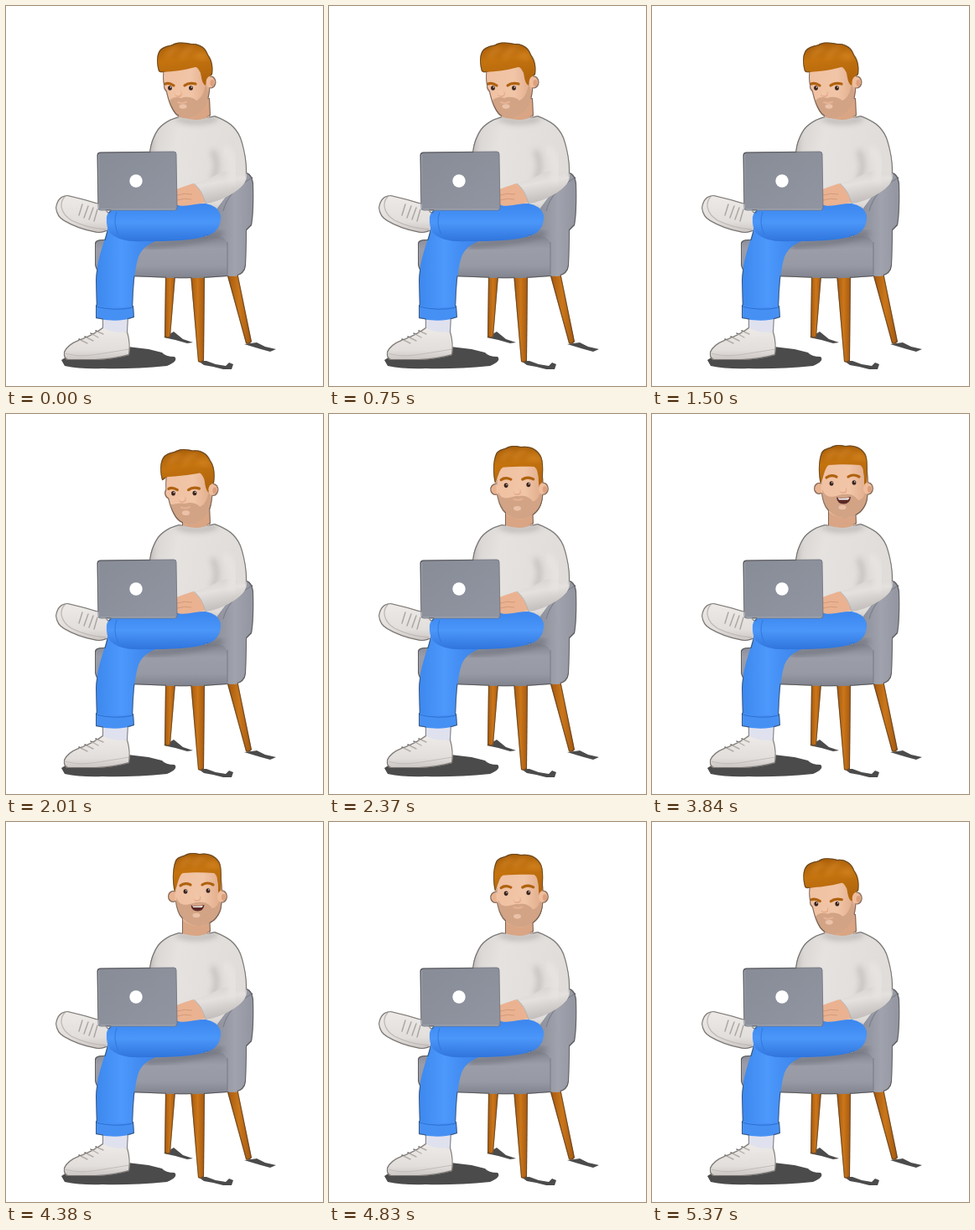
Write an HTML page that moves like this. It is 378 px wide and 454 px high and loops after 5.4 s.

```html
<!DOCTYPE html>
<html lang="en">
<head>
<meta charset="utf-8">
<title>Man with laptop</title>
<style>
html, body { margin: 0; width: 100%; height: 100%; overflow: hidden; background: #fff; }
svg { display: block; width: 378px; height: 454px; }
.soft { filter: url(#blur); fill: none; stroke-linecap: round; }
</style>
</head>
<body>
<svg viewBox="0 0 378 454">
<defs>
  <filter id="blur" x="-30%" y="-30%" width="160%" height="160%" color-interpolation-filters="sRGB"><feGaussianBlur stdDeviation="3.5"/></filter>
  <!-- Dark rim just inside the silhouette -->
  <filter id="rim" filterUnits="userSpaceOnUse" x="0" y="0" width="378" height="454" color-interpolation-filters="sRGB">
    <feMorphology in="SourceAlpha" operator="erode" radius="1" result="core"/>
    <feFlood flood-color="#3c3836" flood-opacity=".6"/>
    <feComposite in2="SourceAlpha" operator="in"/>
    <feComposite in2="core" operator="out" result="edge"/>
    <feMerge><feMergeNode in="SourceGraphic"/><feMergeNode in="edge"/></feMerge>
  </filter>
  <linearGradient id="wood"><stop stop-color="#a2570d"/><stop offset=".5" stop-color="#cb7619"/><stop offset="1" stop-color="#a4580f"/></linearGradient>
  <linearGradient id="seat" x2="0" y2="1"><stop stop-color="#858892"/><stop offset=".3" stop-color="#9b9da8"/><stop offset=".7" stop-color="#979aa5"/><stop offset="1" stop-color="#80838d"/></linearGradient>
  <linearGradient id="back"><stop stop-color="#858892"/><stop offset=".6" stop-color="#a0a2ad"/><stop offset="1" stop-color="#92959f"/></linearGradient>
  <linearGradient id="lid" x2="1" y2="1"><stop stop-color="#878c97"/><stop offset="1" stop-color="#9195a1"/></linearGradient>
  <linearGradient id="wool" x2="1" y2=".2"><stop stop-color="#d2cecc"/><stop offset=".35" stop-color="#e5e2e0"/><stop offset="1" stop-color="#dfdcd9"/></linearGradient>
  <linearGradient id="sleeve" x2=".3" y2="1"><stop stop-color="#d2cecb"/><stop offset=".45" stop-color="#e4e1de"/><stop offset="1" stop-color="#c2bdba"/></linearGradient>
  <linearGradient id="thigh" x2="0" y2="1"><stop stop-color="#3b86ee"/><stop offset=".5" stop-color="#4b96f9"/><stop offset="1" stop-color="#2f74dc"/></linearGradient>
  <linearGradient id="shin"><stop stop-color="#3c88ee"/><stop offset=".4" stop-color="#4c98fb"/><stop offset="1" stop-color="#387fe6"/></linearGradient>
  <linearGradient id="shoe" x2="0" y2="1"><stop stop-color="#edeae7"/><stop offset=".7" stop-color="#e2dedb"/><stop offset="1" stop-color="#c9c4c1"/></linearGradient>
  <linearGradient id="skin"><stop stop-color="#f0c1a2"/><stop offset=".6" stop-color="#f1c5a7"/><stop offset="1" stop-color="#dfaa89"/></linearGradient>
  <linearGradient id="hair" x2=".2" y2="1"><stop stop-color="#a45a08"/><stop offset=".45" stop-color="#c4730e"/><stop offset="1" stop-color="#b0640c"/></linearGradient>
  <clipPath id="body"><path d="M206 132C191 136 181 143 176 156C172 165 171 172 171 182V244H250L262 228C274 222 286 214 287 204C288 190 285 171 280 157C274 143 265 137 249 131Q228 137 206 132Z"/></clipPath>
  <clipPath id="hairClip"><path data-hair=""/></clipPath>
</defs>

<g fill="#4b4b4c">
  <path d="M66 423L70 430Q90 434 115 433Q150 434 192 430Q206 424 201 419Q190 419 186 414L170 410L145 407L80 414Z"/>
  <path d="M188 396L200 389L211 398L223 402L216 403L202 399Z"/>
  <path d="M229 424L239 424L250 428L262 430L266 426L271 428L269 434L259 434L247 431L236 429Z"/>
  <path d="M284 404L299 402L309 407L322 410L315 413L304 410Z"/>
</g>

<g filter="url(#rim)">
<g fill="url(#wood)">
  <path d="M190 322H202L196 395Q193 398 189 395Z"/>
  <path d="M263 319L276 318L293 401Q290 405 286 403Z"/>
  <path d="M220 320H237L236 424Q233 427 229 425Z"/>
</g>

<path d="M284 199Q293 198 295 212Q296 245 293 262L287 268Q287 285 286 310Q285 321 273 323L240 322V240Q254 214 284 199Z" fill="url(#back)"/>
<path d="M106 283Q107 279 115 279L250 275Q263 275 264 286V323Q230 326 198 325L121 322Q108 321 106 309Z" fill="url(#seat)"/>
<path d="M294 205Q265 220 259 245M264 282V321" fill="none" stroke="#7d808a" stroke-width="1.2"/>
<path d="M168 286Q220 284 256 272" class="soft" stroke="#6b6e79" stroke-width="5"/>

<path d="M59 241Q61 226 74 226Q92 230 111 236L124 248V267Q114 273 104 270Q84 266 69 257Q60 252 59 241Z" fill="url(#shoe)"/>
<path d="M70 228C63 235 65 248 78 256Q96 265 119 267" fill="none" stroke="#bfb9b6" stroke-width="1.3"/>
<path d="M91 237L87 250M98 239L93 253M104 241L99 255M109 243L105 257" stroke="#aaa4a1" stroke-width="1.4" stroke-linecap="round"/>

<path d="M115 370H146L145 389Q130 396 115 386Z" fill="#dfe1ef"/>
<path d="M115 384Q128 392 145 389Q149 402 147 417Q130 422 108 423H73Q68 421 69 413Q73 404 86 399Q103 393 115 384Z" fill="url(#shoe)"/>
<path d="M70 415Q88 420 110 416L147 410" fill="none" stroke="#c3bdba" stroke-width="1.2"/>
<path d="M87 398L97 403M94 395L104 400M101 391L110 396M107 388L116 392" stroke="#b4aeaa" stroke-width="1.4" stroke-linecap="round"/>

<g clip-path="url(#body)">
  <path d="M165 125H292V248H165Z" fill="url(#wool)"/>
  <path d="M170 146Q174 166 170 185M205 135Q228 142 250 134" class="soft" stroke="#aaa4a1" stroke-width="4"/>
  <path d="M247 174Q255 192 247 206M205 243H252" class="soft" stroke="#b5afac" stroke-width="4"/>
  <path d="M288 165Q291 190 286 210" class="soft" stroke="#b5afac" stroke-width="4"/>
</g>

<path d="M122 260C119 281 109 297 107 328L108 364H151C152 336 153 318 157 303Q161 286 184 279Z" fill="url(#shin)"/>
<path d="M107 357Q130 363 152 358L153 372Q132 379 107 373Z" fill="#4690f4"/>
<path d="M107 359Q130 365 152 360" fill="none" stroke="#2c6fd0"/>
<path d="M120 252Q122 241 140 238L238 236Q252 238 256 250Q257 266 244 273C224 281 195 281 166 281Q136 283 124 271Q119 264 120 252Z" fill="url(#thigh)"/>
<path d="M132 246Q127 259 134 273" fill="none" stroke="#3078dc"/>

<path d="M223 212Q232 218 238 235L219 238Q207 240 203 237V219Q211 216 223 212Z" fill="#eab291"/>
<path d="M204 226Q213 223 222 225M204 232Q213 229 221 231" fill="none" stroke="#d59a79"/>
<path d="M224 212Q240 208 252 201Q266 192 286 204Q286 214 270 224Q254 234 238 236Q235 220 224 212Z" fill="url(#sleeve)"/>
<path d="M262 172Q274 185 270 206" class="soft" stroke="#e6e3e0" stroke-width="12"/>
<path d="M224 212Q234 220 238 236" fill="none" stroke="#b6b0ac"/>

<path d="M109 178Q109 175 112 175L200 174Q203 174 203 177L204 241Q204 244 201 244L113 244Q110 244 110 241Z" fill="url(#lid)" stroke="#6b6f79" stroke-width=".8"/>
<path d="M110.500 177V242M112 243H202" stroke="#adb0b9" stroke-width=".8"/>
<circle cx="155" cy="209" r="7.700" fill="#fff"/>

<path d="M210 116L243 110L244 131Q230 140 210 133Z" fill="#d9a584"/>
<g id="head"></g>
</g>
</svg>
<script>
const head = document.getElementById('head');
const clip = document.querySelector('[data-hair]');
const loop = 5400, step = 30, middle = 3600;

const clamp = v => Math.max(0, Math.min(1, v));
const ease = v => (v = clamp(v), v * v * (3 - 2 * v));

// Blends two paths that share the same commands.
function mix(a, b, p) {
  const ends = b.match(/-?[\d.]+/g);
  let i = 0;
  return a.replace(/-?[\d.]+/g, n => (+n + (ends[i++] - n) * p).toFixed(2));
}

// Each pair holds a shape looking down and the same shape looking up.
const hair = [
  'M182,78C179,68 179,56 185,51C192,46 196,48 200,45C208,42 216,44 221,45C232,44 239,51 241,58C247,66 247,75 246,82C243,84 240,88 238,95C234,93 233,86 232,80C230,76 228,73 226,73C212,77 198,78 189,79C186,79 184,80 182,78Z',
  'M201,84C198,72 198,56 202,46C205,41 210,41 214,39C219,36 226,37 231,38C240,36 250,40 254,47C258,53 257,68 256,82C256,86 256,88 254,89C252,84 254,76 252,70C252,66 251,63 248,61C236,60 222,60 211,61C206,63 204,78 201,84Z'];
const face = [
  'M188,74C186,86 187,95 191,103C194,116 198,128 208,133C221,138 237,128 241,112C245,98 244,80 238,70C225,62 200,62 188,74Z',
  'M203,62C201,80 201,92 203,101C206,116 216,124 230,124C245,124 255,114 257,101C259,90 258,74 256,62C240,54 218,54 203,62Z'];
const beard = [
  'M195,113C197,122 200,130 208,133C221,138 237,128 241,112C242,106 241,100 238,94C236,104 233,110 227,113C222,108 214,108 209,110C204,108 198,109 195,113Z',
  'M203,90C204,114 216,124 230,124C245,124 256,114 257,99C257,96 257,92 256,88C254,98 251,102 246,103C241,96 234,95 229,96C222,95 209,106 203,90Z'];
const brows = [
  'M190,93Q194,91 200,95M213,95Q218,91 226,93',
  'M208,76Q213,72 220,75M234,75Q240,71 247,75'];
const locks = [
  'M192,60Q196,52 204,51M210,61Q214,52 222,51M227,61Q232,55 237,63',
  'M209,53Q213,45 220,45M224,52Q228,44 236,44M241,52Q246,46 251,54'];

function draw(now) {
  const t = Math.floor(now % loop / step) * step;
  const away = Math.abs(t - middle);
  const p = ease((1830 - away) / 800);
  const smile = ease((1050 - away) / 350);

  const at = (a, b) => a + (b - a) * p;
  const path = (pair, style) => `<path d="${mix(...pair, p)}" ${style}/>`;
  const oval = (x0, y0, x1, y1, rx, ry, fill) =>
    `<ellipse cx="${at(x0, x1)}" cy="${at(y0, y1)}" rx="${rx}" ry="${ry}" fill="${fill}"/>`;
  const line = (color, width) =>
    `fill="none" stroke="${color}" stroke-width="${width}" stroke-linecap="round"`;
  const eye = (x0, y0, x1, y1) =>
    oval(x0, y0, x1, y1, 2.4, 2.8, '#39251f') + oval(x0 + .8, y0 - 1, x1 + .8, y1 - 1, .7, .7, '#fff');

  const mx = at(210, 228.5), my = at(115, 99.5), w = 5 + 3.5 * smile;
  const mouth = smile > .05
    ? `<path d="M${mx - w},${my}Q${mx},${my + 2} ${mx + w},${my - .5}Q${mx + w - 1},${my + 8 * smile} ${mx},${my + 8 * smile}Q${mx - w + 1},${my + 8 * smile} ${mx - w},${my}Z" fill="#5b2925"/>
       <path d="M${mx - w + 1.5},${my + .8}Q${mx},${my + 2} ${mx + w - 1.5},${my + .5}L${mx + w - 3},${my + 3 * smile}H${mx - w + 3}Z" fill="#fff"/>`
    : `<path d="M${mx - w},${my}Q${mx},${my + 2} ${mx + w},${my - .5}" ${line('#e6b296', 2)}/>`;

  clip.setAttribute('d', mix(...hair, p));
  head.innerHTML =
    oval(194, 96, 199, 89, 6, 7, '#e8b391') +
    path(face, 'fill="url(#skin)"') +
    path(beard, 'fill="#d2a385"') +
    path(hair, 'fill="url(#hair)"') +
    `<g clip-path="url(#hairClip)">${path(locks, 'class="soft" stroke="#d88a2c" stroke-width="4"')}</g>` +
    oval(244.5, 91, 258, 89, 6, 7.5, '#efbd9c') +
    oval(246, 92, 259.5, 90, 2.6, 4, '#dca07f') +
    path(brows, line('#b0620f', 3.2)) +
    eye(195.5, 98, 214, 83) + eye(220.5, 98, 241, 82) +
    oval(205.5, 105, 228, 91, 4.3, 3.7, '#e3a889') +
    oval(205, 104, 227.5, 90, 3.8, 3.3, '#f2c5a7') +
    oval(211, 120, 227, 111.5, 4.5, 2.8, '#ebc2a8') +
    mouth;
}

function tick(now) {
  draw(now);
  requestAnimationFrame(tick);
}
draw(0);
requestAnimationFrame(tick);
</script>
</body>
</html>
```
